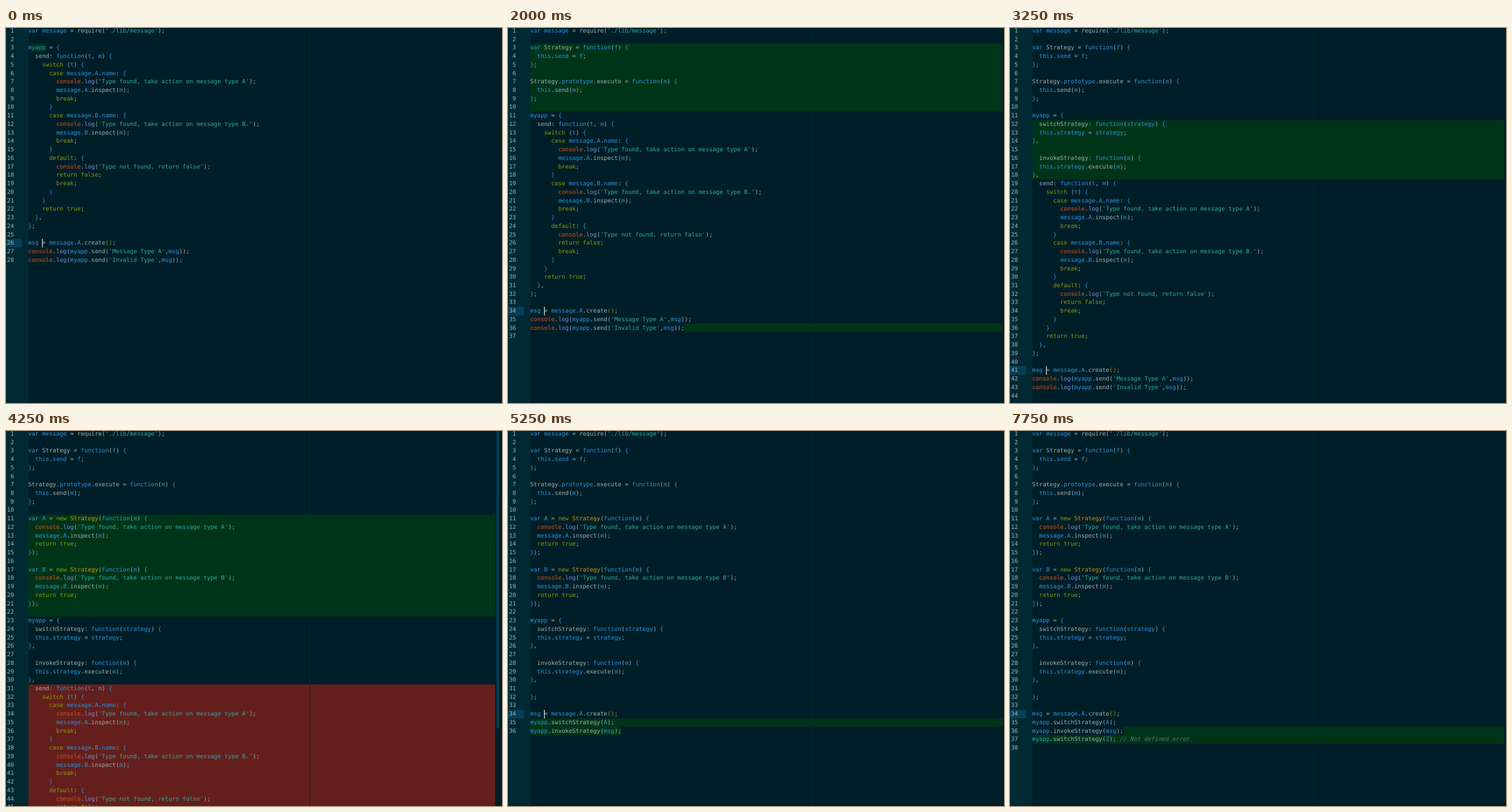
An HTML page with a canvas for the animation above (8.25 s loop, 861 by 651 pixels).

```html
<!DOCTYPE html>
<html lang="en">
<head>
<meta charset="utf-8">
<title>Refactoring to a strategy</title>
<style>
  html, body { margin: 0; width: 100%; height: 100%; overflow: hidden; background: #001e27; }
  canvas { display: block; }
</style>
</head>
<body>
<canvas id="editor" width="861" height="651"></canvas>
<script>
const ctx = document.getElementById('editor').getContext('2d');
const WIDTH = 861, HEIGHT = 651, LOOP = 8250;
const ROW = 14.74, TOP = -2.5, BASELINE = 10.3, LEFT = 38.4, COL = 6.093;
const FONT = '10.12px "DejaVu Sans Mono", monospace';
const COLOR = {
  back: '#001e27', gutter: '#002933', active: '#063f55', guide: '#04292f', thumb: '#003f54',
  number: '#a3b5b8', plain: '#a0b3b5', blue: '#2a96e6', keyword: '#8c9d0c', string: '#2fada7',
  orange: '#dc5420', violet: '#7d8fdd', yellow: '#d2970f', comment: '#5a7580',
  added: '#003418', removed: '#641f1c'
};

// Code blocks
const head = `var message = require('./lib/message');
`;
const strategy = `var Strategy = function(f) {
  this.send = f;
};

Strategy.prototype.execute = function(m) {
  this.send(m);
};
`;
const instance = name => `var ${name} = new Strategy(function(m) {
  console.log('Type found, take action on message type ${name}');
  message.${name}.inspect(m);
  return true;
});
`;
const open = 'myapp = {';
const methods = `  switchStrategy: function(strategy) {
  this.strategy = strategy;
},

  invokeStrategy: function(m) {
  this.strategy.execute(m);
},`;
const branch = (name, dot) => `      case message.${name}.name: {
        console.log('Type found, take action on message type ${name}${dot}');
        message.${name}.inspect(m);
        break;
      }`;
const send = `  send: function(t, m) {
    switch (t) {
${branch('A', '')}
${branch('B', '.')}
      default: {
        console.log('Type not found, return false');
        return false;
        break;
      }
    }
    return true;
  },`;
const close = `};

msg = message.A.create();`;
const calls = `console.log(myapp.send('Message Type A',msg));
console.log(myapp.send('Invalid Type',msg));`;
const newCalls = `myapp.switchStrategy(A);
myapp.invokeStrategy(msg);`;
const finished = [head, strategy, instance('A'), instance('B'), open, methods, '', close];

// A mark covers whole rows from..to, optionally limited to columns.
const mark = (color, from, to = from, startCol = 0, endCol = null) =>
  ({ color, from, to, startCol, endCol });
const step = (at, blocks, ...marks) => {
  const lines = blocks.join('\n').split('\n');
  return { at, lines, marks, cursorRow: lines.findIndex(line => line.startsWith('msg =')) };
};
const steps = [
  step(0, [head, open, send, close, calls], mark('added', 3, 3, 1, 5)),
  step(1250, [head, strategy, open, send, close, calls, ''],
    mark('added', 3, 10), mark('added', 36, 36, 44)),
  step(2250, [head, strategy, open, methods, send, close, calls, ''], mark('added', 12, 18)),
  step(3500, [head, strategy, instance('A'), instance('B'), open, methods, send, close, calls, ''],
    mark('added', 11, 22), mark('removed', 31, 50)),
  step(4500, [...finished, '', ''], mark('added', 31, 34), mark('removed', 35)),
  step(5250, [...finished, newCalls], mark('added', 35), mark('added', 36, 36, 0, 26)),
  step(6250, [...finished, newCalls, 'myapp.switchStrategy(Z); // Not defined error', ''],
    mark('added', 36, 36, 26), mark('added', 37))
];

const tokenPattern = /\/\/.*|'[^']*'|\w+|\(\)|\S/g;
const keywords = /^(switch|case|break|default|return|true|false|new)$/;

function tokenColor(token, before, after) {
  if (token.startsWith('//')) return COLOR.comment;
  if (token[0] === "'") return COLOR.string;
  if (token === '()' || keywords.test(token)) return COLOR.keyword;
  if (/[{}]/.test(token) || token === 'function') return COLOR.blue;
  if (token === 'console') return COLOR.orange;
  if (token === 'log') return COLOR.violet;
  if (token === 'Strategy') return before.endsWith('new ') ? COLOR.yellow : COLOR.plain;
  const isKey = after[0] === ':' && !before.endsWith('.');
  if (!/\w/.test(token) || isKey || /^(\(| = function)/.test(after)) return COLOR.plain;
  return COLOR.blue;
}

function fill(color, x, y, width, height) {
  ctx.fillStyle = color;
  ctx.fillRect(x, y, width, height);
}

const rowTop = row => TOP + row * ROW;
const colX = col => LEFT + col * COL;

function drawLine(line, row) {
  const y = rowTop(row) + BASELINE;
  ctx.font = FONT;
  ctx.textAlign = 'right';
  ctx.fillStyle = COLOR.number;
  ctx.fillText(row + 1, 13.8, y);
  ctx.textAlign = 'left';
  for (const { 0: token, index } of line.matchAll(tokenPattern)) {
    ctx.font = token.startsWith('//') ? 'italic ' + FONT : FONT;
    ctx.fillStyle = tokenColor(token, line.slice(0, index), line.slice(index + token.length));
    ctx.fillText(token, colX(index), y);
  }
}

function draw(time) {
  const { at, lines, marks, cursorRow } = steps.findLast(s => s.at <= time);
  const scrolls = lines.length * ROW > HEIGHT;
  const right = scrolls ? 849 : 858;

  fill(COLOR.back, 0, 0, WIDTH, HEIGHT);
  fill(COLOR.gutter, 0, 0, 39, HEIGHT);
  for (const { color, from, to, startCol, endCol } of marks) {
    const x = Math.max(39, Math.round(colX(startCol)));
    const end = endCol === null ? right : Math.round(colX(endCol));
    const y = Math.round(rowTop(from - 1));
    fill(COLOR[color], x, y, end - x, Math.round(rowTop(to)) - y);
  }
  fill(COLOR.guide, 527, 0, 1, HEIGHT);
  const cursorY = Math.round(rowTop(cursorRow));
  fill(COLOR.active, 0, cursorY, 28, 15);
  if (scrolls) fill(COLOR.thumb, 851.5, 0, 4.5, 516);

  lines.forEach(drawLine);

  const cursorOn = time % 1000 < 500 || time - at < 250;
  if (cursorOn) fill('#e4eaea', 62.6, cursorY, 1.3, 15);
}

ctx.textRendering = 'geometricPrecision';
const start = performance.now();
function tick() {
  draw((performance.now() - start) % LOOP);
  requestAnimationFrame(tick);
}
tick();
</script>
</body>
</html>
```
